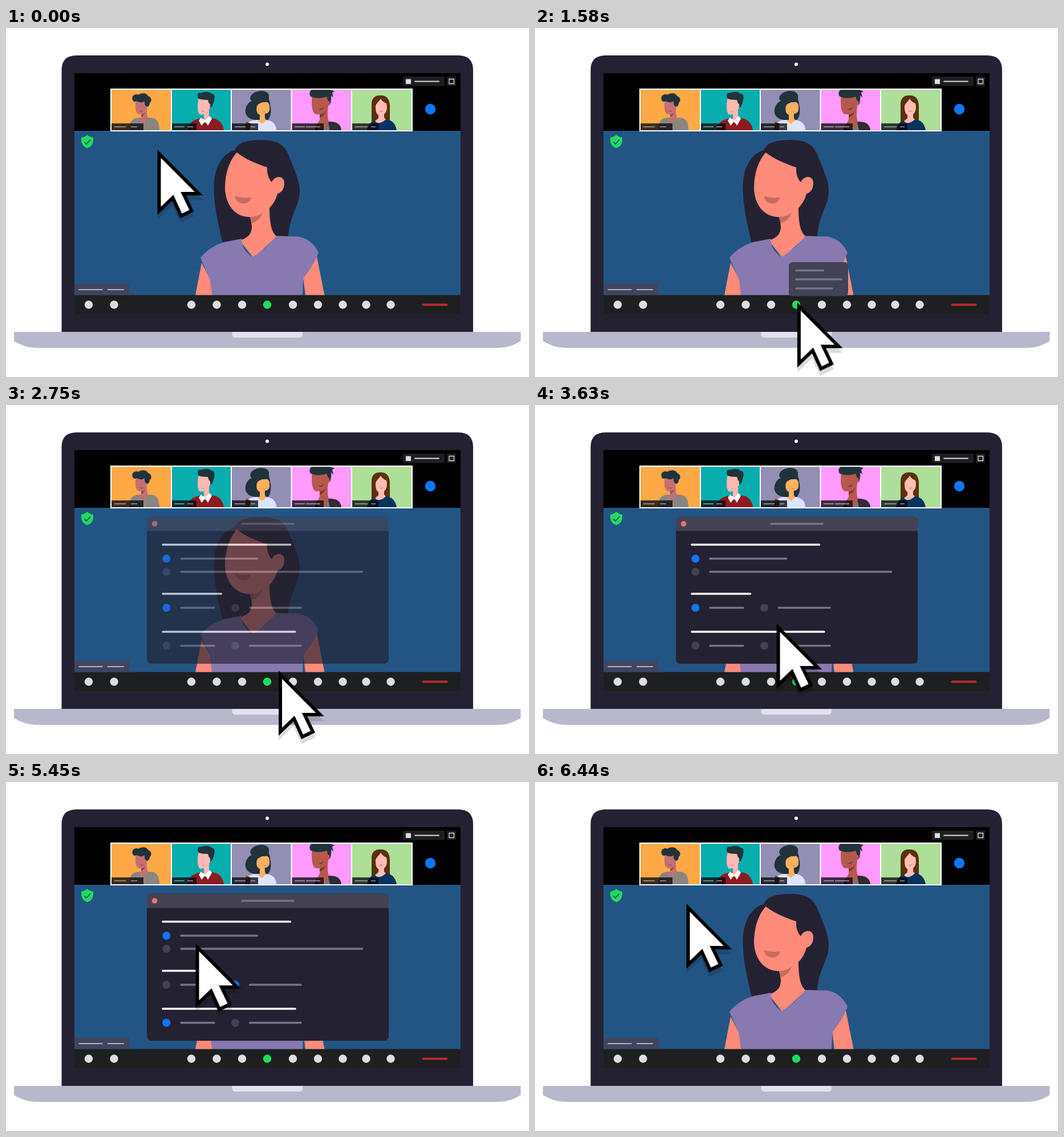
Animation, 917 px wide and 611 px high, one loop 7.64 s. Source, as an HTML page:

```html
<!DOCTYPE html>
<html lang="en">
<head>
<meta charset="utf-8">
<title>Video call settings</title>
<style>
html, body { margin: 0; width: 100%; height: 100%; overflow: hidden; background: #fff; }
svg { display: block; width: 100%; height: 100%; }

:root {
  --ink: #242232; --panel: #434254; --mute: #777585;
  --blue: #0d78ff; --green: #1fdd5c; --bar: #1d1f21; --light: #dedee0;
  --skin: #ff8b7a; --hair: #20333b;
}
.ink { fill: var(--ink); }
.panel { fill: var(--panel); }
.bar { fill: var(--bar); }
.light { fill: var(--light); }
.skin { fill: var(--skin); }
.hair { fill: var(--hair); }
.blue { fill: var(--blue); }
.green { fill: var(--green); }
.rule { fill: none; stroke: var(--mute); stroke-width: 3.4; stroke-linecap: round; }
.white { stroke: #fff; }
.thin { fill: none; stroke: #fff; stroke-width: 1.2; opacity: .85; }

/* One 7.64 s timeline; moves advance in 30 ms steps. */
.cursor, .menu, .dialog, .pick, .drop { animation: 7.64s linear infinite; }

.cursor { animation-name: travel; }
@keyframes travel {
  0% { transform: translate(265.5px, 213px); }
  11.387% { transform: translate(265.5px, 213px); animation-timing-function: steps(17, start); }
  18.063% { transform: translate(458px, 482px); }
  20.680% { transform: translate(458px, 482px); animation-timing-function: steps(11, start); }
  25% { transform: translate(478px, 465px); }
  42.015% { transform: translate(478px, 465px); animation-timing-function: steps(19, start); }
  49.476% { transform: translate(409px, 361px); }
  68.586% { transform: translate(409px, 361px); animation-timing-function: steps(15, start); }
  74.476%, 100% { transform: translate(265.5px, 213px); }
}

.menu { animation-name: menu; }
@keyframes menu {
  0% { opacity: 0; }
  16.099% { opacity: 0; animation-timing-function: steps(5, start); }
  18.063% { opacity: 1; }
  28.141% { opacity: 1; animation-timing-function: steps(15, start); }
  34.031%, 100% { opacity: 0; }
}

.dialog { animation-name: dialog; }
@keyframes dialog {
  0% { opacity: 0; }
  34.031% { opacity: 0; animation-timing-function: steps(9, start); }
  37.565% { opacity: 1; }
  77.617% { opacity: 1; animation-timing-function: steps(18, start); }
  84.685%, 100% { opacity: 0; }
}

.pick { --from: var(--panel); --to: var(--blue); animation-name: toggle; }
.drop { --from: var(--blue); --to: var(--panel); animation-name: toggle; }
@keyframes toggle {
  0% { fill: var(--from); }
  53.010% { fill: var(--from); animation-timing-function: steps(14, start); }
  58.507%, 100% { fill: var(--to); }
}
</style>
</head>
<body>
<svg viewBox="0 0 917 611">
  <defs>
    <clipPath id="tiles">
      <path d="M185 108.3H289V179H185ZM291 108.3H394V179H291ZM396 108.3H499.5V179H396ZM501.5 108.3H605V179H501.5ZM607 108.3H711V179H607Z"/>
    </clipPath>
    <clipPath id="stage"><path d="M120 180H797V467.5H120Z"/></clipPath>
    <path id="arrow" d="M3 7.2V107L27 84L41.5 116L60 107L45.5 77H72.5Z"/>
  </defs>

  <!-- laptop -->
  <path class="ink" d="M97.5 532V74Q97.5 48 123.500 48H793Q819 48 819 74V532Z"/>
  <circle cx="458" cy="63.5" r="3" fill="#fff"/>
  <path fill="#b8b8cc" d="M14 532H902.500V548Q884 560 864 560H53Q33 560 14 548Z"/>
  <path fill="#e2e2ee" d="M396.500 532H520V536Q520 542 514 542H402.500Q396.500 542 396.500 536Z"/>

  <!-- screen -->
  <path d="M120 79H797V181H120Z"/>
  <path fill="#235584" d="M120 180H797V468H120Z"/>
  <path class="bar" d="M120 467.500H797V501H120Z"/>

  <!-- window controls -->
  <rect class="bar" x="696" y="85" width="73" height="16.500" rx="1.500"/>
  <rect class="bar" x="773" y="85" width="16" height="16.500" rx="1.500"/>
  <path class="light" d="M701 89.500H710V98H701Z"/>
  <path class="rule" stroke-width="2" style="stroke:#dedee0;stroke-width:1.8" d="M717 93.500H759"/>
  <path fill="none" stroke="#dedee0" stroke-width="1.300" d="M777 89.500H785.500V97.500H777Z"/>
  <circle class="blue" cx="744" cy="142" r="9.200"/>

  <!-- participants -->
  <path fill="#fff" d="M183 106H713V181H183Z"/>
  <g clip-path="url(#tiles)">
    <path fill="#ffa946" d="M184 107H290V180H184Z"/>
    <path fill="#08adad" d="M290 107H395V180H290Z"/>
    <path fill="#938eb4" d="M395 107H500.500V180H395Z"/>
    <path fill="#ff9aff" d="M500.500 107H606V180H500.500Z"/>
    <path fill="#addf98" d="M606 107H712V180H606Z"/>

    <g>
      <path fill="#8a8580" d="M216 179C216 163 222 157 234 157H255C266 158 269 167 269 179Z"/>
      <path fill="#c57070" d="M228 126C226 137 226 150 234 151L237 151V157C237 164 230 166 235 166C241 166 250 161 249 157C247 153 247 146 247 139C253 136 250 129 246 132L244 125Z"/>
      <path class="hair" d="M222 126C219 119 227 114 232 117C237 113 247 113 249 119C256 121 256 129 252 131C252 136 249 139 246 137C243 136 243 131 243 128C238 132 233 130 229 128C226 130 223 129 222 126Z"/>
      <path fill="#914c52" d="M233 144Q237 146 241 144Q238 149 233 144ZM237 151Q242 151 244 147Q243 154 237 156Z"/>
    </g>

    <g>
      <path fill="#8e1b20" d="M319 179Q319 165 334 160L342 158H362Q379 160 382 179Z"/>
      <path fill="#ffb9b4" d="M338 122C335 133 335 150 341 152L347 151V158L342 164L350 166L356 155V142C364 139 361 130 357 134L355 124Z"/>
      <path class="hair" d="M338 124C334 119 337 111 341 114C349 111 357 111 360 115C367 115 366 122 365 126C364 133 361 138 358 141C358 137 359 131 356 132L354 126C348 126 342 125 338 124Z"/>
      <path fill="#fff" d="M342 157L338 162L343 171L349 163L354 171L361 159L357 154L349 162Z"/>
      <path fill="#d3837d" d="M342 145Q346 147 349 144Q347 149 342 145Z"/>
    </g>

    <g>
      <path class="hair" d="M437 161C425 160 418 152 420 142C422 133 427 129 431 128C424 122 432 113 441 111C452 108 463 113 461 121C460 127 463 129 463 134C466 145 464 157 459 161Z"/>
      <path fill="#dde4ff" d="M418 179C419 166 429 161 438 161H456C467 162 474 168 474 179Z"/>
      <path fill="#ffb05f" d="M442 130C438 139 438 150 445 152V159Q445 163 440 162L449 168L457 161Q453 161 454 150C459 150 463 146 462 140C463 134 459 128 455 130Z"/>
      <path class="hair" d="M440 137C442 131 449 132 453 127C457 126 459 130 463 132L460 121L440 121Z"/>
      <path fill="#c6803d" d="M449 145Q453 148 457 145Q453 150 449 145Z"/>
      <path fill="#714017" d="M418 179L421 164L429 167L427 179Z"/>
    </g>

    <g>
      <path fill="#302b34" d="M541 179Q544 165 558 164H570Q587 165 588 179Z"/>
      <path fill="#77757a" d="M556 179L560 166H565L568 179Z"/>
      <path fill="#b5594d" d="M537 116C535 132 536 148 543 151L550 151V160Q548 166 543 170L548 179H556Q564 172 566 164C563 155 564 145 565 136C572 134 570 124 566 127L564 116Z"/>
      <path class="hair" d="M534 120C530 114 534 108 538 107H567C571 110 573 109 576 111L572 113L574 122L570 118C571 126 569 130 568 134C567 130 568 126 565 128L562 120C553 124 542 123 534 120Z"/>
      <path fill="#7f392f" d="M546 141Q552 143 557 138Q555 147 546 141ZM550 151Q557 151 561 145Q559 154 550 157Z"/>
    </g>

    <g>
      <path fill="#5b300c" d="M641 164V133C641 122 648 117 657 118C668 118 673 125 673 137V164Z"/>
      <path fill="#04345f" d="M633 179Q637 163 648 162L667 160Q682 162 685 179Z"/>
      <path fill="#ffbdb4" d="M657 124C652 131 649 132 648 137C648 147 650 151 653 152V158L647 163Q654 171 666 160L663 157V151C668 147 669 139 667 132Q661 130 657 124Z"/>
      <path fill="#ca7c73" d="M654 144Q658 146 662 144Q658 149 654 144Z"/>
    </g>

    <path opacity=".78" fill="#080a10" d="M185 167H241V179H185ZM291 167H334V179H291ZM396 167H442V179H396ZM501 167H557V179H501ZM607 167H653V179H607Z"/>
  </g>
  <path class="thin" d="M190 173H210M219 173H230M295 173H313M318 173H328M401 173H420M429 173H437M506 173H524M526 173H551M612 173H634M640 173H648"/>

  <!-- speaker -->
  <g clip-path="url(#stage)">
    <path class="ink" d="M380 376C369 332 364 302 364.500 276C365 244 380 219 401 214C407 199 426 196 447 196C478 196 489 205 497 226C509 256 515 270 515 286C514 303 511 307 506 320C499 338 495 350 495 370Z"/>
    <path class="skin" d="M343 411L332 468H362L358 440ZM545 400L558.500 468H525L521 437Z"/>
    <path class="skin" d="M404.500 218C420 230 440 238 458 244C457 255 461 265 466 270C470 260 482 257 487 266C490 277 485 288 476 290C473 301 468 309 462 315C462 340 465 358 475 365L434 403L410 372C427 366 431 359 431 346Q430 338 428 331C401 331 385 309 384 281C384 252 393 231 404.500 218Z"/>
    <path fill="#c66c60" d="M428 331Q442 330 450 323Q445 338 431 342ZM401.500 294Q415 299 429.500 296C429 304 422 308 414 307C406 306 402 301 401.500 294Z"/>
    <path fill="#8879b0" d="M413 369L382 375C363 381 349 392 341 402L358 441L361 468H520L521 438C533 424 542 409 548 393C540 377 528 367 511 365L474 364C462 380 449 391 432 401C420 393 413 382 413 369Z"/>
  </g>

  <!-- call overlay -->
  <path class="green" d="M142.500 187Q147 191 153 192V198Q152 207 142.500 210.500Q133 207 132 198V192Q138 191 142.500 187Z"/>
  <path fill="none" stroke="#235584" stroke-width="2" d="M137.500 199.500L141 203L148 195.500"/>
  <path fill="#3f455f" d="M120 447.500H217V467.500H120Z"/>
  <path fill="none" stroke="#d5d7df" stroke-width="1.700" d="M127.500 458H169.500M178 458H207"/>

  <!-- toolbar -->
  <g id="buttons" class="light"></g>
  <path class="rule" style="stroke:#b82a30;stroke-width:4" d="M731.500 484.500H772.500"/>

  <g class="menu">
    <rect class="panel" x="445" y="410" width="104" height="59.500" rx="6"/>
    <path class="rule" d="M458 424.500H505.500M458 440H537.500M458 456H521"/>
  </g>

  <g class="dialog">
    <rect class="ink" x="247" y="195.500" width="424" height="257.500" rx="8"/>
    <path class="panel" d="M247 220.500V203.500Q247 195.500 255 195.500H663Q671 195.500 671 203.500V220.500Z"/>
    <circle cx="260.500" cy="208" r="4.800" fill="#e8736f"/>
    <path class="rule" d="M414 208H504M307 269H440.500M307 292H624.500M307 355H365M427.500 355H517M307 421.500H365M427.500 421.500H517"/>
    <path class="rule white" d="M275 244.500H498.500M275 330.500H377.500M275 397H507"/>
    <circle class="blue" cx="281.300" cy="269" r="7"/>
    <circle class="panel" cx="281.300" cy="292" r="7"/>
    <circle class="drop" cx="281.300" cy="355" r="7"/>
    <circle class="pick" cx="402" cy="355" r="7"/>
    <circle class="pick" cx="281.300" cy="421.500" r="7"/>
    <circle class="panel" cx="402" cy="421.500" r="7"/>
  </g>

  <g class="cursor" stroke-width="6">
    <use href="#arrow" y="8.500" stroke="#000" opacity=".14"/>
    <use href="#arrow" fill="#fff" stroke="#000"/>
  </g>
</svg>
<script>
const buttons = document.getElementById("buttons");
for (const x of [145, 189.5, 325, 369.5, 414, 458, 503, 547, 590.5, 631.5, 674.5]) {
  const dot = document.createElementNS(buttons.namespaceURI, "circle");
  dot.setAttribute("cx", x);
  dot.setAttribute("cy", 484.5);
  dot.setAttribute("r", 7.2);
  if (x === 458) dot.setAttribute("class", "green");
  buttons.append(dot);
}
</script>
</body>
</html>
```
